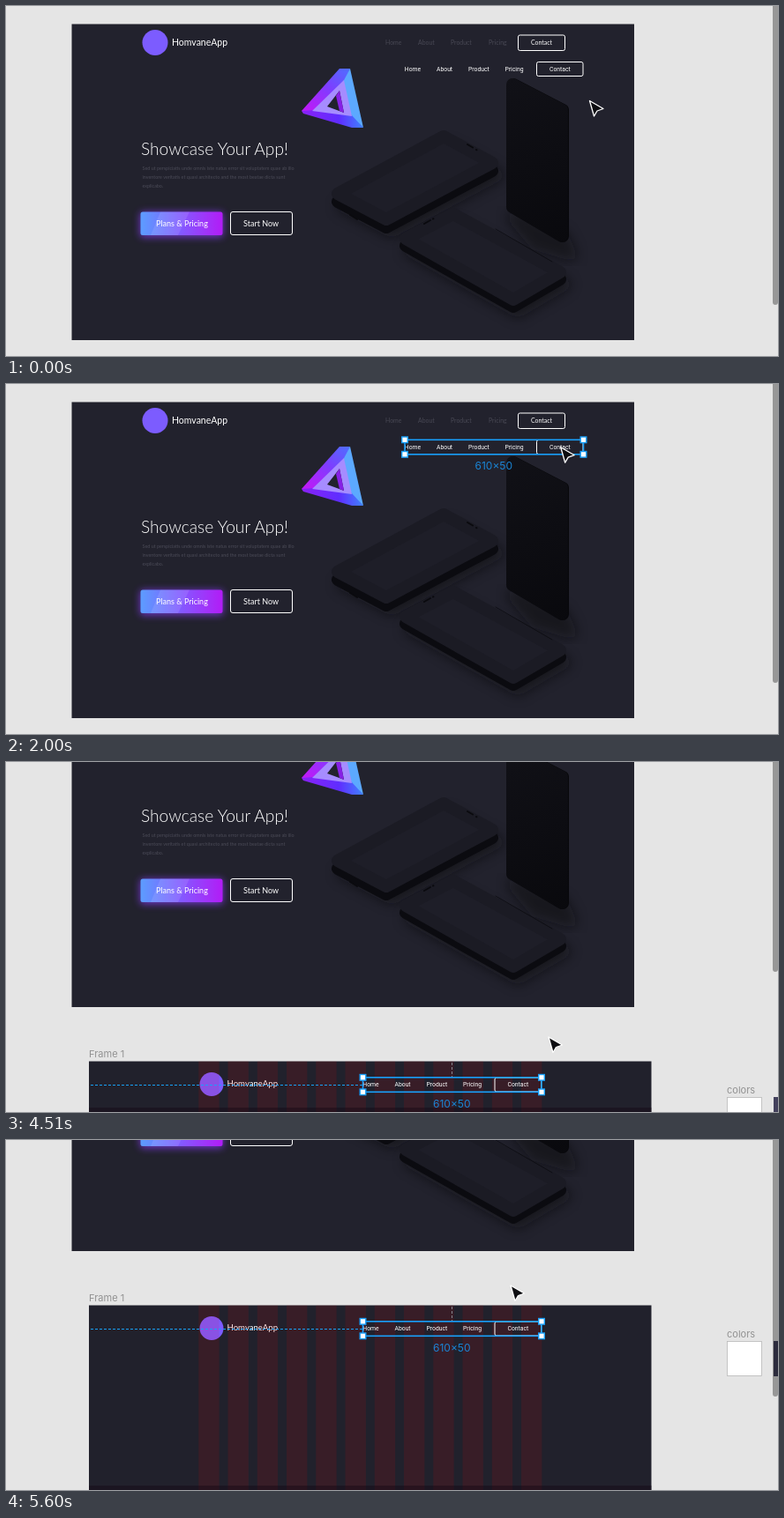
An HTML page for the animation above (6460 ms loop, 875x397 px).

```html
<!DOCTYPE html>
<html lang="en">
<head>
<meta charset="utf-8">
<title>Moving a navigation bar</title>
<style>
  html, body { margin: 0; width: 100%; height: 100%; overflow: hidden; background: #e5e5e5; }
  svg { display: block; width: 875px; height: 397px; }
  text { font-family: Lato, sans-serif; fill: #fff; white-space: pre; }
  .nav text { font: 6.8px Roboto, sans-serif; }
  .old text { font-size: 6.9px; }
  .old .dim { fill: #484854; }
  .copy text { font-size: 5.4px; fill: #4b4b57; }
  .button text { font-size: 9px; }
  .caption { font: 11px Inter, sans-serif; fill: #929292; }
  .size { font: 12px Inter, sans-serif; fill: #1a85d6; text-anchor: middle; }
  .box { fill: none; stroke: #fff; }
  .blue { fill: none; stroke: #18a0fb; }
  .handles rect { fill: #fff; stroke: #18a0fb; stroke-width: 1.4; }
  .slab { stroke-width: 14; stroke-linejoin: round; }
  .side { fill: #0b0b10; stroke: #0b0b10; }
  .face { fill: #1e1e28; stroke: #1b1b24; }
  .shade { fill: #08080c; stroke: #08080c; opacity: .5; filter: url(#soft); }
  .detail { fill: none; stroke: #0a0a0e; stroke-linecap: round; }
  .guide { fill: none; stroke: #ea4f2b; stroke-width: 1.3; }
</style>
</head>
<body>
<svg viewBox="0 0 875 397">
  <defs>
    <linearGradient id="violet">
      <stop offset="0" stop-color="#5c9dff"/><stop offset=".5" stop-color="#8459ff"/><stop offset="1" stop-color="#b21cf6"/>
    </linearGradient>
    <linearGradient id="edge" x1="0" y1="1" x2="1" y2="0">
      <stop offset=".1" stop-color="#bb1cf8"/><stop offset=".55" stop-color="#7f3cff"/><stop offset="1" stop-color="#4d70ff"/>
    </linearGradient>
    <linearGradient id="base">
      <stop offset="0" stop-color="#8a22f5"/><stop offset=".6" stop-color="#602cff"/><stop offset="1" stop-color="#3f83ff"/>
    </linearGradient>
    <linearGradient id="glass" gradientUnits="userSpaceOnUse" x1="568" y1="80" x2="638" y2="270">
      <stop offset="0" stop-color="#111117"/><stop offset="1" stop-color="#09090d"/>
    </linearGradient>
    <filter id="soft" x="-30%" y="-30%" width="160%" height="160%"><feGaussianBlur stdDeviation="7"/></filter>
    <filter id="glow" x="-30%" y="-60%" width="160%" height="220%"><feGaussianBlur stdDeviation="4"/></filter>
    <polygon id="leftPhone" points="376,213 496,148 551,178 431,242"/>
    <polygon id="lowPhone" points="453,264 507,236 628,302 575,333"/>
    <polygon id="tallPhone" points="575,89 631,118 631,261 575,228"/>
  </defs>

  <rect width="875" height="397" fill="#e5e5e5"/>
  <g id="world">
    <rect x="74.5" y="20.5" width="637.5" height="358.5" fill="#22222d"/>

    <g class="slab">
      <use href="#leftPhone" class="shade" x="6" y="14"/>
      <use href="#lowPhone" class="shade" x="5" y="14"/>
      <polygon class="shade" points="575,240 631,262 640,282 600,270"/>
      <use href="#leftPhone" class="side" y="9"/>
      <use href="#leftPhone" class="face"/>
      <use href="#lowPhone" class="side" y="8"/>
      <use href="#lowPhone" class="face"/>
      <use href="#tallPhone" fill="#07070a" stroke="#07070a"/>
      <use href="#tallPhone" fill="url(#glass)" stroke="url(#glass)" x="-1"/>
    </g>
    <path class="detail" stroke-width="2" d="M523 157l6 3.500M533 163l.5.3M474 247l7-4M484 241.500l.5-.3M390 237l8 5"/>
    <path class="detail" stroke-width=".7" d="M555 253l64 37"/>

    <polygon fill="url(#edge)" points="335,119 378,71 390,71 384,86 349,120"/>
    <polygon fill="#5ca9ff" points="390,71 405,138 390,125 382,86"/>
    <polygon fill="url(#base)" points="335,119 350,118 391,123 405,138 392,138 337,122"/>
    <path fill="#a68cff" fill-rule="evenodd" d="M383 84L347 119L392 125ZM378 96L364 114L383 121Z"/>
    <polygon fill="#8720e6" points="378,96 383,121 378,119 374,102"/>

    <circle cx="169" cy="41.500" r="14.500" fill="#7c5cff"/>
    <text x="188" y="44.500" font-size="10.5">HomvaneApp</text>
    <g class="old">
      <text class="dim" x="430" y="44">Home</text><text class="dim" x="467" y="44">About</text>
      <text class="dim" x="504" y="44">Product</text><text class="dim" x="547" y="44">Pricing</text>
      <rect class="box" x="580.5" y="33" width="53" height="17.500" rx="2"/><text x="595" y="44">Contact</text>
    </g>

    <text x="153" y="169" font-size="19.2" font-weight="300">Showcase Your App!</text>
    <g class="copy">
      <text x="154.500" y="186">Sed ut perspiciatis unde omnis iste natus error sit voluptatem quae ab illo</text>
      <text x="154.500" y="196">inventore veritatis et quasi architecto and the most beatae dicta sunt</text>
      <text x="154.500" y="206">explicabo.</text>
    </g>
    <g class="button">
      <rect x="152" y="234" width="94" height="28" rx="3" fill="#8a3cff" opacity=".75" filter="url(#glow)"/>
      <rect x="152.500" y="233.500" width="93" height="26.500" rx="2.500" fill="url(#violet)"/>
      <polygon points="175,233.5 208,233.5 195,260 164,260" fill="#fff" opacity=".1"/>
      <text x="170" y="249.800">Plans &amp; Pricing</text>
      <rect class="box" x="254.500" y="233.500" width="70" height="26" rx="2.500"/>
      <text x="269" y="249.800">Start Now</text>
    </g>

    <text class="caption" x="94" y="436">Frame 1</text>
    <rect x="94" y="440.500" width="637.500" height="500" fill="#21212c"/>
    <circle cx="233" cy="466.500" r="13.500" fill="#7c5cff"/>
    <text x="250.500" y="468.500" font-size="9.6">HomvaneApp</text>
    <g id="columns" fill="#f00" opacity=".1"></g>
    <rect id="target" class="blue" x="93.500" y="439.500" width="638.500" height="500" stroke-width="2"/>

    <text class="caption" x="817" y="477">colors</text>
    <rect x="817.500" y="481.500" width="39" height="39" fill="#fff" stroke="#b9b9b9" stroke-width=".8"/>
    <rect x="870" y="481" width="40" height="40" fill="#43415c"/>

    <g id="pins" fill="none" stroke-width="1">
      <path id="pinLeft" d="M96 467.500H404" stroke-dasharray="3 2"/>
      <path d="M505.500 442V458" stroke="#85858d" stroke-dasharray="3 2"/>
    </g>

    <g id="nav" class="nav">
      <text x="451.800" y="73.700">Home</text><text x="488" y="73.700">About</text>
      <text x="524" y="73.700">Product</text><text x="565.500" y="73.700">Pricing</text>
      <rect class="box" x="601.500" y="63.500" width="52.500" height="16" rx="2"/><text x="616" y="73.700">Contact</text>
      <g id="selection">
        <rect class="blue" x="452" y="63.300" width="202.500" height="16.500" stroke-width="1.600"/>
        <g id="handles" class="handles"></g>
        <text class="size" style="font:12px Inter,sans-serif" x="552.800" y="97.300">610×50</text>
      </g>
    </g>

    <g id="measure" class="guide">
      <path d="M606.500 441V940M297 467.300H508"/>
      <path d="M297 465l5 5m0-5l-5 5M304 465l5 5m0-5l-5 5M503 465l5 5m0-5l-5 5"/>
    </g>
  </g>

  <rect id="bottomShade" x="94" y="392" width="637.500" height="5" fill="#160814" opacity=".45"/>
  <rect id="thumb" x="869" y="-10" width="6" rx="3" fill="#000" opacity=".34"/>
  <rect id="marquee" class="blue" style="fill:#18a0fb1a"/>
  <g id="cursor">
    <circle id="press" cx="-1" cy="-1" r="12" fill="#d8c800" opacity=".6"/>
    <path d="M0 0L5 17.500L8.500 11.500L15.500 9Z" fill="#0d0d11" stroke="#fff" stroke-width="1.300" stroke-linejoin="round"/>
  </g>
</svg>

<script>
  const LOOP = 6460;
  const el = Object.fromEntries([...document.querySelectorAll("[id]")].map(n => [n.id, n]));

  // Bursts of motion: first step, last step, number of steps (ms).
  const BURSTS = [
    [70, 700, 9], [780, 930, 3], [1080, 1690, 9], [1770, 1850, 2], [2000, 2000, 1],
    [2400, 2540, 3], [3500, 3500, 1], [3880, 4050, 3], [4510, 4510, 1], [4890, 5600, 10]
  ];

  const CURSOR = [
    [0, 661.5, 107.5], [228, 667, 126], [621, 431, 47], [700, 452, 51],
    [780, 560, 118], [855, 640, 152], [930, 622.5, 132.5], [1080, 619, 128],
    [1385, 607.5, 100], [1690, 626, 73], [1850, 627.5, 73], [2000, 628.7, 71.7],
    [2400, 606, 190], [2470, 583, 330], [2540, 579, 367], [3500, 579, 367],
    [3880, 585, 358], [3965, 603, 332], [4050, 613, 316], [4510, 615, 312],
    [4890, 613, 318], [5205, 589, 381], [5363, 584, 290], [5521, 574, 182], [5600, 572, 165]
  ];
  const SCROLL = [[0, 0], [2000, 0], [2400, 36], [2470, 78], [2540, 101], [4510, 101], [4890, 102],
    [5205, 124], [5363, 188], [5521, 246], [5600, 253]];
  const THUMB = [[0, 339], [2000, 339], [2540, 238], [4510, 238], [5205, 226], [5600, 291]];
  const DRAG = [[0, 0], [2000, 0], [2400, .4], [2470, .87], [2540, 1]];
  const ANCHOR = [667, 126];

  function snap(t) {
    let time = 0;
    for (const [start, end, count] of BURSTS) {
      if (t < start) break;
      const gap = (end - start) / (count - 1) || 1;
      time = Math.min(end, start + Math.floor((t - start) / gap + .1) * gap);
    }
    return time;
  }

  function at(keys, t) {
    const i = keys.findIndex(k => k[0] > t);
    if (i < 0) return keys.at(-1).slice(1);
    const a = keys[i - 1], b = keys[i], p = (t - a[0]) / (b[0] - a[0]);
    return a.slice(1).map((v, n) => v + (b[n + 1] - v) * p);
  }

  function add(parent, tag, attributes) {
    const node = document.createElementNS(parent.namespaceURI, tag);
    set(node, attributes);
    parent.append(node);
  }
  function set(node, attributes) {
    for (const name in attributes) node.setAttribute(name, attributes[name]);
  }
  const move = (node, x, y) => set(node, { transform: `translate(${x} ${y})` });
  const show = (node, visible) => { node.style.display = visible ? "" : "none"; };

  for (let i = 0; i < 12; i++)
    add(el.columns, "rect", { x: 218.3 + i * 33.25, y: 440.5, width: 23.3, height: 500 });
  for (const x of [452, 654.5])
    for (const y of [63.3, 79.8])
      add(el.handles, "rect", { x: x - 3.3, y: y - 3.3, width: 6.6, height: 6.6 });

  function draw(now) {
    const t = snap(now % LOOP);
    const [x, y] = at(CURSOR, t);
    const [scroll] = at(SCROLL, t);
    const [drag] = at(DRAG, t);
    const dragging = t >= 2400 && t < 3500;
    const dropped = t >= 3500;

    move(el.world, 0, -scroll);
    move(el.cursor, x, y);
    move(el.nav, -47.5 * drag, 294.5 * drag + (drag ? Math.min(scroll, 101) : 0));
    set(el.thumb, { height: at(THUMB, t)[0] + 10 });

    show(el.selection, t >= 455 && !dragging);
    show(el.press, dragging);
    show(el.target, t >= 2470 && dragging);
    show(el.measure, t >= 2540 && dragging);
    show(el.pins, dropped);
    show(el.bottomShade, t >= 2540);
    set(el.pinLeft, { stroke: t >= 4890 && t < 5600 ? "#a3a3a8" : "#18a0fb" });

    show(el.marquee, t > 230 && t < 700);
    set(el.marquee, { x, y, width: Math.max(0, ANCHOR[0] - x), height: Math.max(0, ANCHOR[1] - y) });
  }

  function tick() {
    draw(performance.now());
    requestAnimationFrame(tick);
  }
  tick();
</script>
</body>
</html>
```
